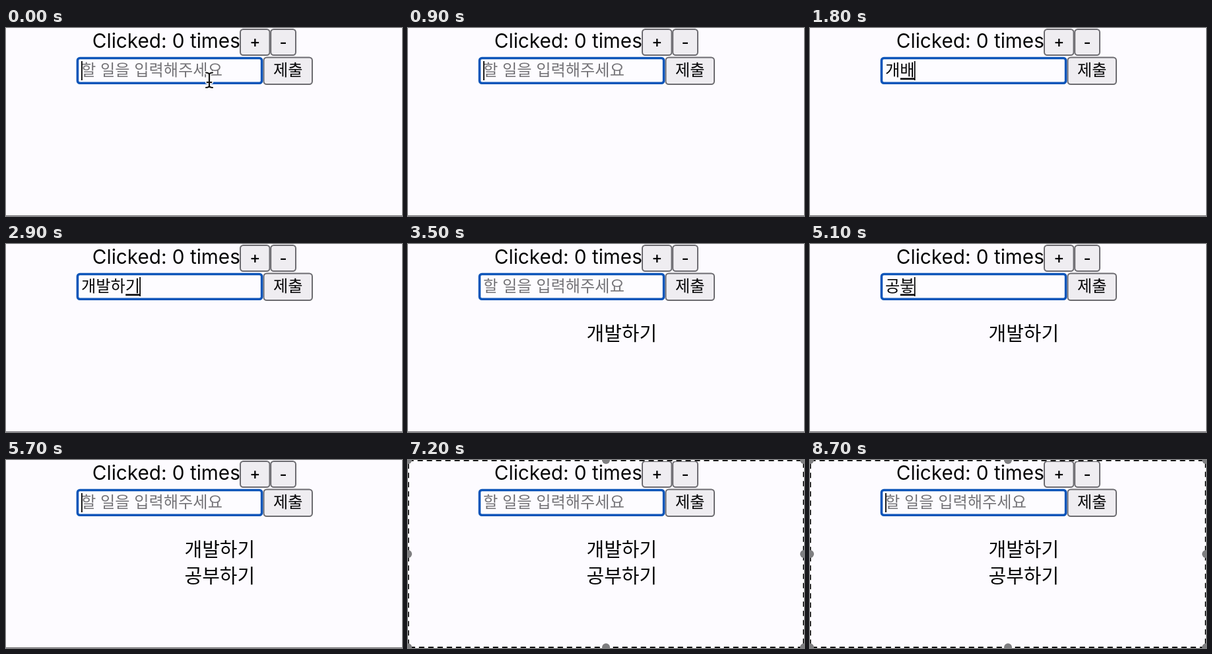
Recreate the animation shown at these times as an HTML page. Size 600 by 284 pixels, loop 9100 ms.

```html
<!DOCTYPE html>
<html lang="ko">
<head>
<meta charset="utf-8">
<title>Todo input</title>
<style>
  html, body { margin: 0; width: 100%; height: 100%; overflow: hidden; background: #fdfbff; }
  svg { display: block; width: 600px; height: 284px; }
  text { font-family: Inter, "Noto Sans CJK KR", "Noto Sans KR", sans-serif; fill: #050506; }
  .page { font-size: 29.7px; }
  .item { font-size: 29px; }
  .field { font-size: 24.2px; }
  .label { font-size: 24.2px; text-anchor: middle; }
  .sign { font-weight: 500; }
  .button { fill: #efedf1; stroke: #6d6c71; stroke-width: 2; }
  #hint { fill: #757478; }
</style>
</head>
<body>
<svg viewBox="0 0 600 284">
  <defs>
    <path id="beam" d="M303 67.5Q308 67.5 308 71Q308 67.5 313 67.5M308 71V87M303 90Q308 90 308 87Q308 90 313 90M304.5 82H311.5"/>
  </defs>
  <rect width="600" height="284" fill="#fdfbff"/>
  <rect y="283" width="600" height="1" fill="#6f6e72"/>

  <text class="page" x="130.8" y="30">Clicked: 0 times</text>
  <rect class="button" x="355" y="2" width="44.5" height="39" rx="4.5"/>
  <text class="label sign" x="377.3" y="29">+</text>
  <rect class="button" x="401.2" y="2" width="37.8" height="39" rx="4.5"/>
  <text class="label sign" x="420" y="30">-</text>
  <rect class="button" x="390.5" y="44.5" width="73.5" height="40.5" rx="4.5"/>
  <text class="label" x="427.2" y="72">제출</text>

  <rect x="108.4" y="45.5" width="279.2" height="37.8" rx="3.5" fill="#fdfcff" stroke="#0d55b9" stroke-width="3.6"/>
  <text class="field" id="hint" x="114" y="72">할 일을 입력해주세요</text>
  <text class="field" id="typed" x="114" y="72"></text>
  <rect id="underline" y="75.5" width="22.2" height="2.6" fill="#050506"/>
  <rect id="caret" y="50" width="1.8" height="29" fill="#050506"/>

  <text class="item" id="first" x="270.5" y="146">개발하기</text>
  <text class="item" id="second" x="270.5" y="185.7">공부하기</text>

  <g id="pointer" fill="none" stroke-linecap="round">
    <use href="#beam" stroke="#fff" stroke-width="5"/>
    <use href="#beam" stroke="#111" stroke-width="2.2"/>
  </g>

  <g id="selection" fill="none" stroke-width="2">
    <rect x="0.5" y="0.8" width="599" height="282.2" stroke="#fff"/>
    <rect x="0.5" y="0.8" width="599" height="282.2" stroke="#000" stroke-dasharray="8 6"/>
    <g id="handles" fill="#7e7e80"></g>
  </g>
</svg>
<script>
  const LOOP = 9100, LEFT = 114, ADVANCE = 22.2;
  const $ = id => document.getElementById(id);

  // [time, text in the field]; an empty field shows the hint
  const typing = [
    [0, ""],
    [1200, "ㄱ"], [1400, "개"], [1600, "갭"], [1800, "개배"], [2000, "개발"],
    [2200, "개밣"], [2400, "개발하"], [2500, "개발학"], [2700, "개발하기"],
    [3000, ""],
    [4000, "ㄱ"], [4200, "고"], [4400, "공"], [4600, "공ㅂ"], [4800, "공부"],
    [5100, "공붛"], [5300, "공부하"], [5400, "공부학"], [5500, "공부하기"],
    [5700, ""]
  ];
  const blinks = [
    [0, true], [400, false], [900, true], [3400, false], [3900, true],
    [6200, false], [6700, true], [7200, false], [7700, true], [8200, false], [8700, true]
  ];

  const at = (steps, t) => steps.findLast(step => step[0] <= t)[1];
  const show = (id, on) => $(id).setAttribute("visibility", on ? "visible" : "hidden");

  for (const x of [0, 300, 600])
    for (const y of [0, 142, 283]) {
      if (x === 300 && y === 142) continue;
      const dot = document.createElementNS("http://www.w3.org/2000/svg", "circle");
      dot.setAttribute("cx", x);
      dot.setAttribute("cy", y);
      dot.setAttribute("r", 6);
      $("handles").append(dot);
    }

  function draw(t) {
    const text = at(typing, t);
    const end = LEFT + text.length * ADVANCE;
    $("typed").textContent = text;
    $("underline").setAttribute("x", end - ADVANCE + 0.6);
    $("caret").setAttribute("x", end - (text ? 0.6 : 0));
    show("hint", !text);
    show("underline", text);
    show("caret", at(blinks, t));
    show("pointer", t < 100);
    show("first", t >= 3000);
    show("second", t >= 5700);
    show("selection", t >= 7200);
  }

  const start = performance.now();
  function tick() {
    draw((performance.now() - start) % LOOP);
    requestAnimationFrame(tick);
  }
  tick();
</script>
</body>
</html>
```
